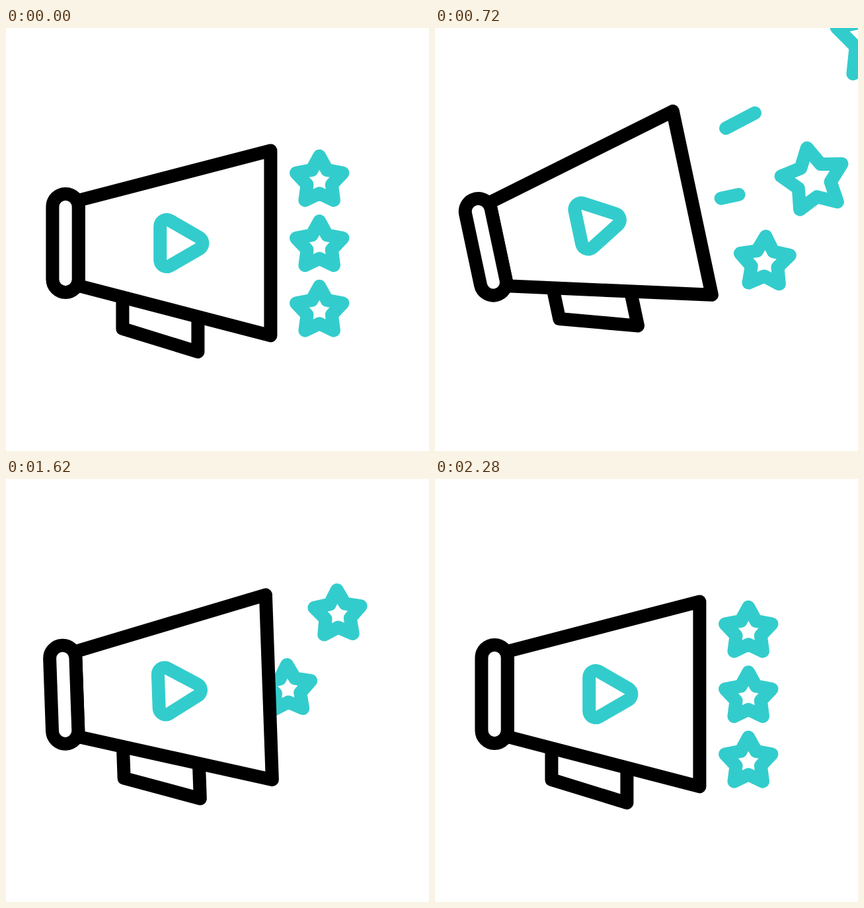
These frames come from a looping animation (640x640 px, 2400 ms). An HTML page:

```html
<!DOCTYPE html>
<html lang="en">
<head>
<meta charset="utf-8">
<title>Megaphone and stars</title>
<style>
  html, body { margin: 0; width: 100%; height: 100%; overflow: hidden; background: #fff; }
  svg { display: block; width: 100%; height: 100%; }
  .ink, .teal { fill: none; stroke-width: 20; stroke-linecap: round; stroke-linejoin: round; }
  .ink { stroke: #000; }
  .teal { stroke: #33cccc; }
</style>
</head>
<body>
<svg viewBox="0 0 640 640" xmlns="http://www.w3.org/2000/svg">
  <g id="all">
    <g id="rays"></g>
    <g id="stars"></g>
    <path class="ink" d="M176 409V454.5L290 489.6V440"/>
    <path id="cone" class="ink" style="fill:#fff"/>
    <rect class="ink" style="fill:#fff" x="70" y="250.5" width="39.3" height="149" rx="19.6"/>
    <path class="teal" style="fill:#33cccc;stroke-width:40" d="M242.8 299.7V350.7L287 325.2Z"/>
    <path fill="#fff" d="M242.8 299.7V350.7L287 325.2Z"/>
  </g>
</svg>
<script>
const LOOP = 2400, STEP = 204;
const $ = id => document.getElementById(id);

function addPaths(parent) {
  return [0, 1, 2].map(() => {
    const p = document.createElementNS('http://www.w3.org/2000/svg', 'path');
    p.setAttribute('class', 'teal');
    parent.appendChild(p);
    return p;
  });
}
const rays = addPaths($('rays')), stars = addPaths($('stars'));

const clamp = u => Math.min(1, Math.max(0, u));
const ease = u => { u = clamp(u); return u * u * (3 - 2 * u); };

// keys: [time, value] pairs, eased between neighbours
function track(keys, t) {
  if (t <= keys[0][0]) return keys[0][1];
  for (let i = 1; i < keys.length; i++) {
    const [t0, a] = keys[i - 1], [t1, b] = keys[i];
    if (t < t1) return a + (b - a) * ease((t - t0) / (t1 - t0));
  }
  return keys[keys.length - 1][1];
}

const TILT = [[212, 0], [670, -12], [1320, -12], [1860, 5], [2080, 0]];
const REACH = [[560, 0], [840, 15], [1260, -26], [1460, 0]];
const RETURN = [[1160, -150], [1640, 35], [1820, 0]];

function starPath(cx, cy, size, turn) {
  let d = '';
  for (let k = 0; k < 10; k++) {
    const r = size * (k % 2 ? 0.53 : 1);
    const a = (turn + k * 36) * Math.PI / 180;
    d += (k ? 'L' : 'M') + (cx + r * Math.sin(a)).toFixed(2) + ' ' + (cy - r * Math.cos(a)).toFixed(2);
  }
  return d + 'Z';
}

function drawStar(i, t) {
  const side = i - 1, back = t - 200 * i;
  let x, p = 0;
  if (back < RETURN[0][0]) {
    p = Math.pow(Math.max(0, t - 212 - STEP * i) / 903, 1.476);
    x = 605 * p;
  } else {
    x = track(RETURN, back);
  }
  const y = side * x * (x < 0 ? 0.2 : 0.345);
  stars[i].setAttribute('d',
    starPath(473.8 + x, 230.3 + 98.5 * i + y, 37 * (1 + 1.65 * p), 360 * p));
}

function drawRay(i, t) {
  const u = t - 412 - STEP * i, side = i - 1;
  const head = 77 * ease(u / 260), tail = 77 * ease((u - 200) / 260);
  const at = x => `${453 + x} ${327 + side * (94 + 0.28 * x)}`;
  rays[i].setAttribute('d', head - tail > 0.5 ? `M${at(tail)}L${at(head)}` : '');
}

function draw(t) {
  $('all').setAttribute('transform', `translate(.4 .4) rotate(${track(TILT, t)} 111 391)`);
  const e = track(REACH, t), x = 400 + e, h = 140 + 0.23 * e;
  $('cone').setAttribute('d', `M109.3 260.5L${x} ${325 - h}V${325 + h}L109.3 389.5Z`);
  for (let i = 0; i < 3; i++) {
    drawStar(i, t);
    drawRay(i, t);
  }
}

const start = performance.now();
function tick() {
  draw((performance.now() - start) % LOOP);
  requestAnimationFrame(tick);
}
tick();
</script>
</body>
</html>
```
